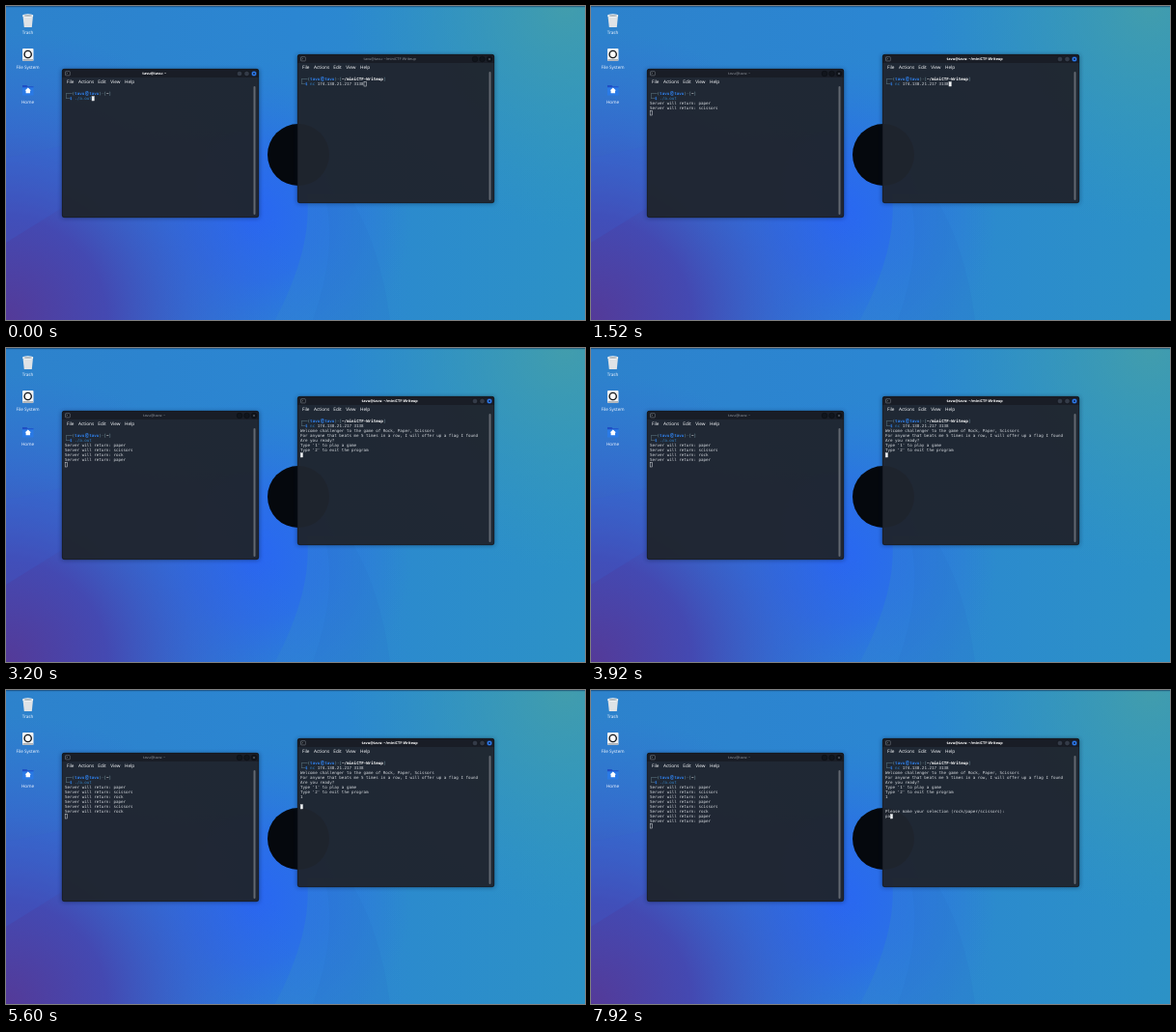
These frames come from a looping animation (600 px wide and 325 px high, 8 s). An HTML page:

```html
<!DOCTYPE html>
<html lang="en">
<head>
<meta charset="utf-8">
<title>Two terminals</title>
<style>
  html, body { margin: 0; width: 100%; height: 100%; overflow: hidden; background: #2a7fd2; }
  svg { display: block; width: 600px; height: 325px; }
  text { white-space: pre; text-rendering: geometricPrecision; fill: #e4e7ec; font: 4.6px "Noto Sans", "Open Sans", sans-serif; }
  .label { text-anchor: middle; fill: #eef4ff; }
  .title { text-anchor: middle; font-size: 3.8px; fill: #8b9098; }
  .active .title { fill: #fff; font-weight: 600; }
  .menu { font-size: 4.7px; fill: #f2f4f7; }
  .mono { font: 4.2px "DejaVu Sans Mono", monospace; fill: #d5d9de; }
  .frame { fill: #7fa3ae; }
  .user { fill: #2f7fe8; font-weight: bold; }
  .wide { font-size: 6px; }
  .path { fill: #fff; font-weight: bold; }
  .cmd { fill: #3480c4; }
  .button { fill: #11151c; stroke: #090c11; stroke-width: .5; }
  .active .button { fill: #343b48; }
  .active .close { fill: #2f7cf0; }
  .cross { stroke: #6c727c; stroke-width: .5; }
  .active .cross { stroke: #10203c; stroke-width: .7; }
  .cursor { fill: none; stroke: #d5d9de; stroke-width: .5; }
  .active .cursor { fill: #f2f4f6; }
</style>
</head>
<body>
<svg id="stage" viewBox="0 0 600 325">
  <defs>
    <linearGradient id="sky" x1="0" y1="0" x2="1" y2="0">
      <stop offset="0" stop-color="#2d82cc"/>
      <stop offset=".5" stop-color="#2b86d2"/>
      <stop offset="1" stop-color="#2c92c6"/>
    </linearGradient>
    <radialGradient id="teal" gradientUnits="userSpaceOnUse" cx="580" cy="0" r="230">
      <stop offset="0" stop-color="#449eaa" stop-opacity=".9"/>
      <stop offset="1" stop-color="#359bb8" stop-opacity="0"/>
    </radialGradient>
    <radialGradient id="glow" gradientUnits="userSpaceOnUse" cx="255" cy="218" r="165">
      <stop offset="0" stop-color="#2866f4"/>
      <stop offset=".4" stop-color="#2a6aec" stop-opacity=".8"/>
      <stop offset="1" stop-color="#2b78dc" stop-opacity="0"/>
    </radialGradient>
    <radialGradient id="purple" gradientUnits="userSpaceOnUse" cx="0" cy="325" r="300">
      <stop offset="0" stop-color="#543a98"/>
      <stop offset=".35" stop-color="#4546b0" stop-opacity=".95"/>
      <stop offset=".65" stop-color="#3a5ccc" stop-opacity=".6"/>
      <stop offset="1" stop-color="#3468d8" stop-opacity="0"/>
    </radialGradient>
    <linearGradient id="sheet" gradientUnits="userSpaceOnUse" x1="290" y1="0" x2="420" y2="0">
      <stop offset="0" stop-color="#3080d4" stop-opacity=".6"/>
      <stop offset="1" stop-color="#3080d4" stop-opacity="0"/>
    </linearGradient>
    <filter id="soft" x="-10%" y="-10%" width="120%" height="120%"><feGaussianBlur stdDeviation="2"/></filter>
  </defs>

  <rect width="600" height="325" fill="url(#sky)"/>
  <rect width="600" height="325" fill="url(#teal)"/>
  <rect width="600" height="325" fill="url(#glow)"/>
  <rect width="600" height="325" fill="url(#purple)"/>
  <path d="M0 157L58 145V209L0 245Z" fill="#3a62d0" opacity=".25"/>
  <path d="M312 195Q318 250 279 325H430V195Z" fill="url(#sheet)"/>
  <path d="M330 195Q345 250 318 325H398Q388 250 358 200Z" fill="#2b72c8" opacity=".18"/>
  <rect width="600" height="1.2" fill="#15375c" opacity=".55"/>
  <circle cx="303" cy="154" r="32" fill="#05080d"/>

  <path d="M17.5 10H28L26.8 22H18.8Z" fill="#dfe3e6"/>
  <ellipse cx="22.7" cy="10" rx="5.6" ry="1.8" fill="#f7f8f8"/>
  <ellipse cx="22.7" cy="10.1" rx="4.3" ry="1" fill="#b4bbc0"/>
  <text class="label" x="22.5" y="28.5">Trash</text>

  <rect x="17" y="44" width="11.5" height="13" rx="1" fill="#f1f2f3"/>
  <circle cx="22.7" cy="50" r="3.6" fill="#fff" stroke="#15181c" stroke-width="1.4"/>
  <rect x="17.5" y="55.3" width="10.5" height="1.3" fill="#8f969d"/>
  <text class="label" x="22.5" y="64.8">File System</text>

  <path d="M17 82H21.5L22.5 83.2H28.5V92.5H17Z" fill="#2a7ae6"/>
  <path d="M17 82H21.5L22.5 83.2H28.5V84.2H17Z" fill="#1f4fc4"/>
  <path d="M22.8 84.6L26 87.4H25V90.2H20.6V87.4H19.6Z" fill="#fff"/>
  <text class="label" x="22.5" y="100.6">Home</text>
</svg>

<script>
const LOOP = 8000, COL = 2.53, ROW = 5;
const ENTER = 100, FOCUS = 760;
const stage = document.getElementById('stage');

function add(parent, tag, attrs, content = '') {
  const node = document.createElementNS('http://www.w3.org/2000/svg', tag);
  for (const key in attrs) node.setAttribute(key, attrs[key]);
  node.textContent = content;
  parent.append(node);
  return node;
}

function makeTerminal(x, y, title) {
  const g = add(stage, 'g', { transform: `translate(${x} ${y})` });
  add(g, 'rect', { x: -1, width: 206, height: 155, rx: 3, fill: '#06142b', opacity: .3, filter: 'url(#soft)' });
  add(g, 'rect', { width: 204, height: 154, rx: 2.5, fill: '#20252f', opacity: .95 });
  add(g, 'path', { d: 'M0 9V2.5Q0 0 2.5 0H201.5Q204 0 204 2.5V9Z', fill: '#191d26' });
  add(g, 'rect', { x: .25, y: .25, width: 203.5, height: 153.5, rx: 2.5, fill: 'none', stroke: '#10141b', 'stroke-width': .5 });
  add(g, 'rect', { x: 3.5, y: 2.7, width: 4.8, height: 4.2, rx: .6, fill: '#12161d', stroke: '#8b929c', 'stroke-width': .5 });
  add(g, 'path', { d: 'M4.6 3.9L5.6 4.7L4.6 5.5', fill: 'none', stroke: '#cfd4da', 'stroke-width': .4 });
  add(g, 'text', { class: 'title', x: 95.7, y: 6.2 }, title);
  [184, 191.5, 199].forEach((cx, i) =>
    add(g, 'circle', { class: i === 2 ? 'button close' : 'button', cx, cy: 5, r: 2.8 }));
  add(g, 'path', { class: 'cross', d: 'M198 4L200 6M200 4L198 6' });
  [['File', 5], ['Actions', 17], ['Edit', 37.3], ['View', 50.3], ['Help', 65]]
    .forEach(([name, left]) => add(g, 'text', { class: 'menu', x: left, y: 14.6 }, name));
  add(g, 'rect', { x: 198.5, y: 18, width: 2, height: 133, rx: 1, fill: '#626871' });
  const cursor = add(g, 'rect', { class: 'cursor', width: 2.3, height: 4.4 });
  return { g, cursor, timed: [] };
}

function write(term, row, col, content, style = '', from = 0) {
  const node = add(term.g, 'text', { class: 'mono ' + style, x: 3 + col * COL, y: 27.2 + row * ROW }, content);
  term.timed.push({ node, from });
}

function writePrompt(term, path) {
  write(term, 0, 0, '┌──(', 'frame');
  write(term, 0, 4, 'tavu', 'user');
  write(term, 0, 8.3, '@', 'user wide');
  write(term, 0, 10, 'tavu', 'user');
  write(term, 0, 14, ')-[', 'frame');
  write(term, 0, 17, path, 'path');
  write(term, 0, 17 + path.length, ']', 'frame');
  write(term, 1, 0, '└─', 'frame');
  write(term, 1, 2, '$', 'user');
}

function update(term, time, active, [row, col]) {
  term.g.setAttribute('class', active ? 'active' : '');
  term.timed.forEach(({ node, from }) => node.setAttribute('visibility', time >= from ? 'visible' : 'hidden'));
  term.cursor.setAttribute('x', 3.2 + col * COL);
  term.cursor.setAttribute('y', 23.6 + row * ROW);
}

const server = makeTerminal(58, 65, 'tavu@tavu: ~');
writePrompt(server, '~');
write(server, 1, 4, './a.out', 'cmd');
'paper scissors rock paper scissors rock paper paper'.split(' ').forEach((move, i) =>
  write(server, 2 + i, 0, 'Server will return: ' + move, '', ENTER + i * 1000));

const client = makeTerminal(302, 50, 'tavu@tavu: ~/miniCTF-Writeup');
writePrompt(client, '~/miniCTF-Writeup');
write(client, 1, 4, 'nc', 'cmd');
write(client, 1, 7, '174.138.21.217 3138');
[
  'Welcome challenger to the game of Rock, Paper, Scissors',
  'For anyone that beats me 5 times in a row, I will offer up a flag I found',
  'Are you ready?',
  "Type '1' to play a game",
  "Type '2' to exit the program"
].forEach((line, i) => write(client, 2 + i, 0, line, '', 2240));
write(client, 7, 0, '1', '', 4200);
write(client, 10, 0, 'Please make your selection (rock/paper/scissors):', '', 6300);
write(client, 11, 0, 'p', '', 7640);
write(client, 11, 1, 'a', '', 7800);

// Client cursor stops: start time, row, column
const stops = [[0, 1, 26], [2000, 2, 0], [2240, 7, 0], [4200, 7, 1], [4900, 9, 0],
  [6300, 11, 0], [7640, 11, 1], [7800, 11, 2]];

function draw() {
  const time = performance.now() % LOOP;
  const lines = Math.floor((time - ENTER) / 1000) + 1;
  update(server, time, time < FOCUS, time < ENTER ? [1, 11] : [2 + lines, 0]);
  update(client, time, time >= FOCUS, stops.findLast(([from]) => time >= from).slice(1));
  requestAnimationFrame(draw);
}
draw();
</script>
</body>
</html>
```
